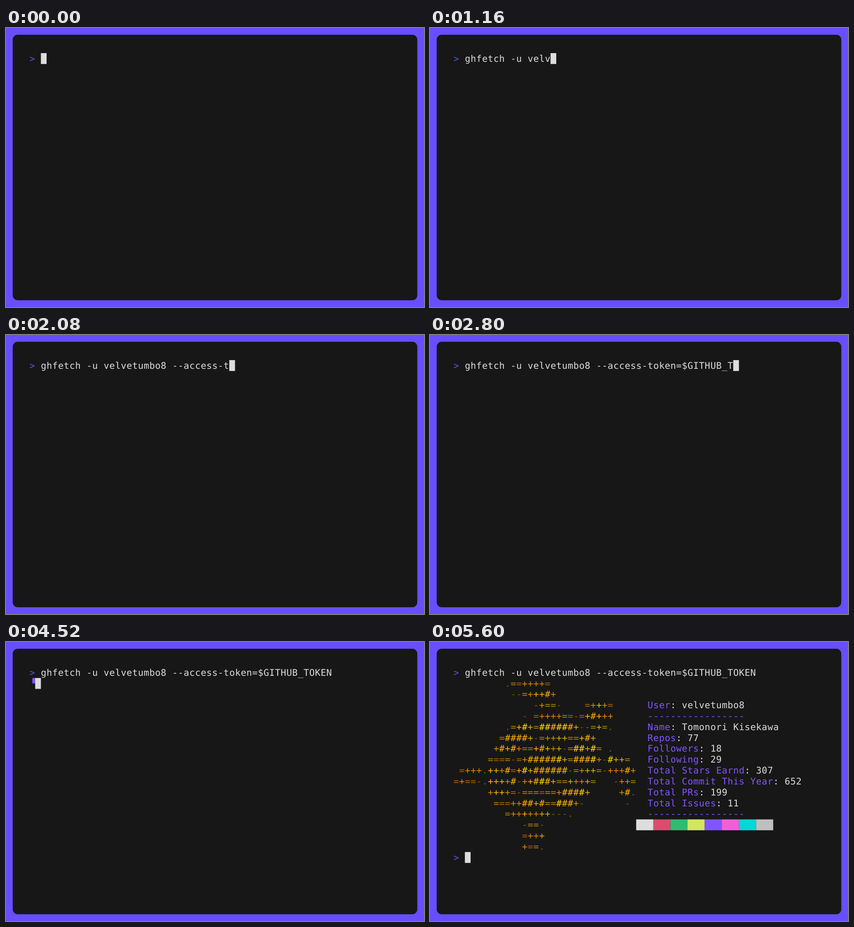
Write an HTML page that moves like this. It is 917 px wide and 611 px high and loops after 8 s.

```html
<!DOCTYPE html>
<html lang="en">
<head>
<meta charset="utf-8">
<title>Terminal profile card</title>
<style>
  html, body { margin: 0; width: 100%; height: 100%; overflow: hidden; background: #674eff; }
  svg { display: block; width: 100%; height: 100%; }
  text {
    font: 20.04px "DejaVu Sans Mono", monospace;
    white-space: pre;
    text-rendering: geometricPrecision;
  }
</style>
</head>
<body>
<svg id="stage" viewBox="0 0 917 611">
  <rect width="917" height="611" fill="#674eff"/>
  <rect x="14.7" y="14.7" width="887.6" height="581.6" rx="11" fill="#171717"/>
</svg>
<script>
const NS = "http://www.w3.org/2000/svg";
const stage = document.getElementById("stage");

// Terminal grid
const LEFT = 51.5, TOP = 55, CELL = 12.525, LINE = 23.82, BASE = 18.7;
const FG = "#dddddd", ACCENT = "#8056ff", PROMPT = "#5a56e0";
const colX = c => LEFT + c * CELL;
const rowY = r => TOP + r * LINE;

// Timeline in ms
const LOOP = 8000, TICK = 40;
const TYPE_START = 440, TYPE_STEP = 50.8, TYPE_LEAD = 4;
const CURSOR_OFF = 3560, ENTER = 4000, DONE = 5600;

const USER = "velvetumbo8";
const COMMAND = `ghfetch -u ${USER} --access-token=$GITHUB_TOKEN`;
const RULE = "-".repeat(17);

const INFO = [
  ["User", USER],
  [RULE],
  ["Name", "Tomonori Kisekawa"],
  ["Repos", "77"],
  ["Followers", "18"],
  ["Following", "29"],
  ["Total Stars Earnd", "307"],
  ["Total Commit This Year", "652"],
  ["Total PRs", "199"],
  ["Total Issues", "11"],
  [RULE]
];

const SWATCHES = [FG, "#d74e6f", "#31bb71", "#d3e561", ACCENT, "#ed61d7", "#04d7d7", "#bfbfbf"];

// Each art row: first column, glyphs, one shade letter per glyph
const SHADES = {
  a: "#5f0000", b: "#5f5f00", c: "#875f00", d: "#af5f00", e: "#af8700",
  f: "#d78700", g: "#d7af00", h: "#ffaf00", i: "#ffd700"
};
const ART = [
  [9, ".==++++=.", "bedffffda"],
  [9, ".--=+++#+.", "abbefhhhfa"],
  [14, "-+==-   .=+++=", "cfeeb   adfhfd"],
  [11, ".-.=++++==-=+#+++.", "abadffffedcdhhhffa"],
  [9, ".=+#+=######+--=+=.", "behigeiihiihgbcegeb"],
  [7, ".=####+-=++++==+#+", "aehhhhgbeffggeehhg"],
  [7, "+#+#+==+#+++-=##+#= .", "fhhhfeehhhfgbeiigie b"],
  [6, "====-=+######+=####+-#++=", "eddecdfhhhhhigehhhifbigge"],
  [0, ".=+++.+++#=+#+######-=+++=-+++#+", "adfffbhhfhdhighhhhhhcefggecfffhf"],
  [0, "=+==-.++++#-++###+==++++=   -++=", "dfddcbhhhfhcfhhihgeegffge   cffe"],
  [6, "++++=-======+####+.    +#.", "fhhfdceeedeefhhhiga    fhb"],
  [6, ".===++##+#==###+-      .-", "aeddffhhgheeihhfc      ab"],
  [8, ".=+++++++---.", "aeffhffggcbbb"],
  [12, "-==-", "ceeb"],
  [12, "=+++", "dffg"],
  [11, ".+==.", "afdeb"]
];

function add(parent, tag, attrs) {
  const node = document.createElementNS(NS, tag);
  for (const key in attrs) node.setAttribute(key, attrs[key]);
  return parent.appendChild(node);
}

// Text with every glyph on its own grid column
function print(parent, row, col, str, fill) {
  const x = [...str].map((_, i) => colX(col + i).toFixed(2)).join(" ");
  const node = add(parent, "text", { x, y: rowY(row) + BASE, fill });
  node.textContent = str;
  return node;
}

function block(parent, row, col, cols, fill) {
  return add(parent, "rect", {
    x: colX(col), y: rowY(row), width: cols * CELL, height: LINE, fill
  });
}

function show(node, on) {
  node.setAttribute("visibility", on ? "visible" : "hidden");
}

print(stage, 0, 0, ">", PROMPT);
const typed = print(stage, 0, 2, COMMAND, FG);

const output = add(stage, "g", {});
ART.forEach(([col, glyphs, tones], i) => {
  [...glyphs].forEach((ch, k) => {
    if (ch !== " ") print(output, i + 1, col + k, ch, SHADES[tones[k]]);
  });
});
INFO.forEach(([label, value], i) => {
  print(output, i + 3, 34, label, ACCENT);
  if (value) print(output, i + 3, 34 + label.length, ": " + value, FG);
});
SWATCHES.forEach((fill, i) => block(output, 14, 32 + i * 3, 3, fill));
print(output, 17, 0, ">", PROMPT);

const spinner = add(stage, "rect", { width: CELL / 2, height: LINE / 2, fill: ACCENT });
const cursor = block(stage, 0, 2, 1, FG);

function typedCount(t) {
  if (t < TYPE_START) return 0;
  const n = 1 + Math.floor((t - TYPE_START + TYPE_LEAD) / TYPE_STEP);
  return Math.min(n, COMMAND.length);
}

// Quadrant order: lower left, upper left, upper right, lower right
function turnSpinner(t) {
  const q = ((t - ENTER) / TICK + 1) % 4;
  spinner.setAttribute("x", colX(q > 1 ? 0.5 : 0));
  spinner.setAttribute("y", rowY(q === 1 || q === 2 ? 1 : 1.5));
}

function cursorCell(t, n) {
  if (t < ENTER) return [0, 2 + n];
  if (t < DONE) return [1, t > ENTER ? 1 : 0];
  return [17, 2];
}

function draw(time) {
  const t = Math.floor((time % LOOP) / TICK) * TICK;
  const n = typedCount(t);
  typed.textContent = COMMAND.slice(0, n);

  const [row, col] = cursorCell(t, n);
  cursor.setAttribute("x", colX(col));
  cursor.setAttribute("y", rowY(row));
  show(cursor, t < CURSOR_OFF || t >= ENTER);

  turnSpinner(t);
  show(spinner, t > ENTER && t < DONE);
  show(output, t >= DONE);
}

const start = performance.now();
function frame() {
  draw(performance.now() - start);
  requestAnimationFrame(frame);
}
draw(0);
requestAnimationFrame(frame);
</script>
</body>
</html>
```
